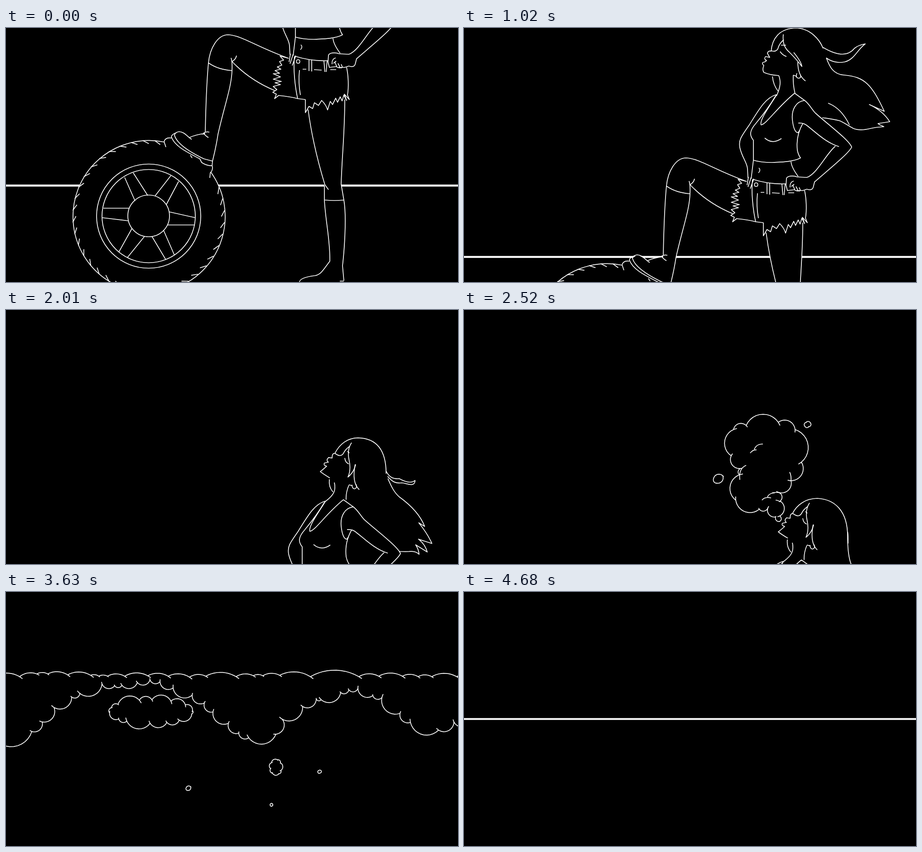
An HTML page that plays this animation: 998 by 561 pixels, repeating every 4830 ms.

```html
<!DOCTYPE html>
<html lang="en">
<head>
<meta charset="utf-8">
<title>Smoke and horizon</title>
<style>
html, body { margin: 0; width: 100%; height: 100%; overflow: hidden; background: #000; }
svg { display: block; width: 100vw; height: 100vh; background: #000; }
path, circle { fill: none; stroke: #fff; stroke-width: 1.7; stroke-linejoin: round; vector-effect: non-scaling-stroke; }
.mask { fill: #000; stroke: none; }
.solid { fill: #000; }
</style>
</head>
<body>
<svg id="stage" viewBox="0 0 998 561">
  <path id="horizon" d="M-5 0H1003"/>
  <g id="figure">
    <g id="wheel">
      <circle class="mask" cx="315" cy="416" r="168"/>
      <circle cx="315" cy="415.5" r="115"/>
      <circle cx="315" cy="415.5" r="103"/>
      <circle cx="315" cy="415" r="46"/>
      <path d="M350 252A168 168 0 1 0 452 318"/>
      <path d="M262 330L285 382M281 320L313 370M364 326L329 371M381 339L354 390M360 406L418 419M357 435H417M348 447L372 502M322 460L353 512M306 460L268 507M278 443L249 495M213 419L271 426M215 398H272"/>
      <path id="tread"/>
    </g>
    <!-- standing leg -->
    <path class="mask" d="M667 175C675 240 690 300 703 348V381C706 430 716 470 715 515C700 535 695 547 680 547Q650 551 648 561V640H746V561L743 525C746 500 752 420 746 380L740 345C742 280 748 230 748 155Z"/>
    <path d="M667 180C675 240 690 300 704 346L712 357M703 348V381C706 430 716 470 715 515C700 535 695 545 682 547Q649 551 648 561M748 158C748 230 742 280 740 345L746 380C753 420 746 500 743 525L746 558M704 380Q725 382 746 380M737 559H746"/>
    <!-- raised leg and shoe -->
    <path class="mask" d="M447 77C442 140 441 180 440 232L407 242L384 229L365 240L352 244L350 253L370 252L428 290L451 305L456 294L468 235C490 150 499 130 500 94Z"/>
    <path d="M447 77C450 45 467 15 490 15C520 16 550 40 624 67M447 77Q468 92 499 94M447 77C442 130 441 180 440 229M499 94C498 130 482 172 468 235Q464 262 456 294M497 66Q500 76 499 94M509 61Q507 70 499 74Q538 115 593 138"/>
    <path d="M436 232Q442 228 449 230M436 232Q440 238 447 242M440 233Q420 235 405 242M410 246C400 240 394 229 382 229Q373 230 372 237C378 258 410 276 437 289L456 294L455 304Q444 305 432 297L428 289C395 272 372 260 365 240Q367 234 377 231M365 243Q352 241 349 251L353 263M455 304Q458 313 451 320L450 331M407 281L411 287"/>
    <!-- shorts -->
    <path d="M624 67L605 62L613 71L604 74L609 82L599 86L607 91L594 94L604 100L590 101L606 108L590 113L608 118L594 121L606 125L590 129L598 136L589 142L597 146L593 156L602 149Q630 152 644 156L661 158"/>
    <path d="M661 158V187L669 173L677 178L681 165L690 171L697 160Q707 170 710 181L716 162L721 169L728 155L732 164L738 152L742 161L746 148L752 160L747 146L758 158L754 148C757 130 756 105 752 87"/>
    <path d="M637 62Q675 74 712 72M628 57L625 75M634 58L627 79M640 61L632 83M637 63C634 90 638 130 644 156M648 93Q645 120 650 148M669 70V95M675 71V96M702 73L704 97M709 72L707 97M655 91H663M680 92L697 93M716 92H729M734 88H742M645 70C640 70 640 78 645 78S650 70 645 70"/>
    <!-- hair behind the arm -->
    <path id="hair"/><path id="strand"/><path id="wisp"/>
    <path class="mask" d="M752 -112C762 -105 768 -92 776 -84C800 -62 850 -25 856 -9C850 5 800 45 774 68L757 58C780 45 805 0 820 -11Q780 -30 738 -62Z"/>
    <!-- torso and arms -->
    <path d="M690 -125C665 -118 650 -90 630 -58C612 -32 606 -25 609 -8C614 15 626 26 626 40L627 59M688 -122C672 -95 660 -80 645 -62C630 -45 630 -35 639 -24V20L634 61M690 -124C672 -95 652 -68 656 -58C668 -60 690 -95 730 -128L752 -112C732 -110 723 -90 725 -70C727 -50 732 -40 738 -41L741 -46"/>
    <path d="M748 -61C736 -40 734 -20 736 -2Q738 8 743 15C725 25 690 24 680 25Q655 25 639 20M664 -29Q681 -14 701 -28M722 23Q723 36 738 56M651 37Q656 42 650 48"/>
    <path d="M752 -112C762 -105 768 -92 776 -84C800 -62 850 -25 856 -9C850 5 800 45 774 68L771 80Q768 88 757 84M738 -62Q750 -63 758 -56C775 -43 800 -18 828 -10M820 -11C800 5 780 50 757 58L736 57C725 53 714 55 712 60L711 75L714 87L731 85M728 66Q719 68 720 80M723 78L729 73M726 75L731 87M733 78L737 86M740 80L743 87M731 87H748L757 84"/>
    <g id="head"></g>
  </g>
  <path id="cloud"/>
  <path id="folds" d="M632 316Q638 308 646 309M641 308Q645 296 660 296M623 343Q606 350 609 375M719 358Q723 366 722 378M658 420Q664 412 678 415M670 413Q674 404 686 404M680 404Q688 402 699 404M688 420Q694 420 698 424"/>
  <path id="puffs"/>
</svg>
<script>
const LOOP = 4830, STEP = 30;
const $ = id => document.getElementById(id);
const clamp = (v, a = 0, b = 1) => Math.min(b, Math.max(a, v));
const mix = (a, b, u) => a + (b - a) * u;
const smooth = u => u * u * (3 - 2 * u);

// smooth curve through keys [time, value, ...]; i picks the value
function track(keys, t, i = 1) {
  const n = keys.length - 1;
  if (t <= keys[0][0]) return keys[0][i];
  if (t >= keys[n][0]) return keys[n][i];
  let k = 0;
  while (t > keys[k + 1][0]) k++;
  const slope = j => {
    const a = keys[Math.max(0, j - 1)], b = keys[Math.min(n, j + 1)];
    return (b[i] - a[i]) / (b[0] - a[0]);
  };
  const [a, b] = [keys[k], keys[k + 1]], d = b[0] - a[0], u = (t - a[0]) / d, w = smooth(u);
  return mix(a[i], b[i], w) + d * u * (1 - u) * (slope(k) * (1 - u) - slope(k + 1) * u);
}

const RISE = [[0, 0], [600, 175], [1020, 272], [1560, 428], [2520, 680], [3200, 864]];
const DRIFT = [[1020, 0], [1560, 15]];
const shift = t => [track(DRIFT, t), track(RISE, t)];

// keys hold stage coordinates; the result is relative to the figure
function morph(keys, t) {
  let k = 0;
  while (k < keys.length - 2 && t > keys[k + 1][0]) k++;
  const a = keys[k], b = keys[k + 1] || a;
  const u = b === a ? 0 : smooth(clamp((t - a[0]) / (b[0] - a[0])));
  const sa = shift(a[0]), sb = shift(b[0]);
  const to = b[1].match(/-?\d+/g);
  let i = 0;
  return a[1].replace(/-?\d+/g, v => {
    const c = i % 2, r = mix(v - sa[c], to[i] - sb[c], u);
    i++;
    return r.toFixed(1);
  });
}

const HAIR = [
  [600, "M800 -31C810 -15 860 -30 900 -40C960 -35 990 -20 984 -6L972 4Q962 15 959 22L975 26Q988 31 998 29L998 32Q996 36 992 41C968 46 960 55 930 49C890 50 890 85 858 82C830 78 835 48 795 62C765 64 745 58 730 38"],
  [1020, "M800 66C807 85 815 103 840 104C885 108 900 125 928 184L895 169Q925 183 940 207L914 211Q916 212 918 214L918 214Q924 216 927 218C910 219 905 220 897 222C885 225 870 226 860 222C850 217 845 212 830 205C815 201 805 200 791 198"],
  [1560, "M840 258C855 276 865 277 880 281C925 288 945 310 953 335L939 327Q965 348 978 371L936 360Q958 372 965 397L933 376Q942 390 942 403C935 394 925 393 915 395C900 396 885 395 858 392C870 404 878 404 881 405C850 408 830 350 782 332"],
  [2520, "M847 500C847 520 848 545 855 562C865 600 880 620 890 640L878 632Q890 660 895 680L880 672Q885 680 888 690L870 680Q874 686 876 694C870 690 865 690 860 690C850 690 840 690 830 690C820 690 815 690 810 690C800 690 790 680 785 660"]
];
const WISP = [
  [1020, "M793 43C830 65 850 60 862 45Q870 38 886 35C868 48 862 70 840 75C825 78 810 74 800 66"],
  [1560, "M833 236C845 258 862 260 885 254Q930 274 949 253C948 285 915 268 895 271C870 278 858 276 839 257"],
  [2520, "M847 490C848 495 848 500 848 505Q848 510 848 515C848 512 848 510 848 505C848 500 848 495 847 490"]
];
const STRAND = [
  [600, "M830 -2Q845 10 863 10"], [1020, "M804 166Q833 177 851 214"],
  [1560, "M841 363Q848 370 857 392"], [2520, "M800 640Q805 655 810 670"]
];
const HEAD = [
  ["M678 52C680 25 695 0 735 0C765 2 785 25 793 45", "M727 198C738 175 755 163 775 163C815 163 833 185 833 238", "M725 450C735 430 755 416 780 416C820 418 847 445 847 500"],
  ["M678 51Q671 50 670 56L675 65L666 63Q661 68 668 72L664 75Q655 76 662 83Q658 92 662 98Q675 104 695 105", "M727 198Q720 196 720 208L712 207L709 211Q709 217 712 217L703 219Q700 224 708 226L704 230Q694 238 700 243Q715 252 725 262"],
  ["M678 50Q688 54 693 46Q696 34 706 26", "M727 198Q740 208 746 196Q750 188 759 182"],
  ["M705 14Q702 40 718 53Q735 70 746 85Q745 75 728 54", "M763 174Q752 190 758 215Q762 235 755 250Q768 240 772 222"],
  ["M737 75Q737 105 754 117", "M771 222Q763 262 780 278"],
  ["M700 38L711 38M698 52Q703 60 712 63", "M754 193L758 197M748 208Q749 218 757 221"],
  ["M695 105C700 118 699 130 690 150M681 107Q683 127 694 140", "M725 262C729 280 724 290 705 304M714 255Q712 272 722 283"],
  ["M727 104Q726 125 731 145M727 104L735 107", "M757 268Q750 285 751 300M757 267L764 269"],
  ["M735 100Q731 110 739 111Q745 110 743 104", "M764 267Q764 276 770 276Q776 274 773 266"]
].map(list => list.map((d, i) => [[1020, 1560, 2520][i], d]));

const pairs = s => s.split(" ").map(p => p.split(",").map(Number));
const PLUME = pairs("623,255 694,248 731,264 745,336 722,377 695,403 698,422 697,455 697,467 688,457 671,437 652,440 600,420 608,364 611,350 590,322 595,264");
const TOP = pairs("-25,186 30,187 68,181 92,181 136,183 187,184 205,186 224,186 262,186 313,185 358,186 405,188 441,186 508,187 546,185 567,185 604,184 672,187 779,187 823,186 875,186 910,187 940,187 995,187 1025,186");
const UNDER = pairs("1025,288 989,287 955,305 893,288 870,268 830,233 810,229 777,213 757,216 739,222 696,238 685,236 655,253 610,281 596,314 536,322 514,312 491,290 457,265 438,245 411,228 369,212 340,198 318,194 290,200 256,206 240,207 212,203 163,224 145,232 106,255 80,287 57,308 -25,325");
// several edge points share one plume point, so new bumps swell from nothing
const spread = (list, ids, k) => list.map((end, i) => ({ start: PLUME[ids[Math.floor(i * ids.length / list.length)]], end, k }));
const EDGE = [
  ...spread(TOP, [16, 0, 1, 2, 3], 1),
  ...spread(UNDER, [4, 5, 6, 7, 8, 9, 10, 11, 12, 13, 14, 15], .57)
];

// outward arc from p to q with a short hook past its end
function bump(p, q, k, flat = y => y) {
  const dx = q[0] - p[0], dy = q[1] - p[1], c = Math.hypot(dx, dy);
  if (c < .6) return "";
  const r = c * k, h = Math.sqrt(Math.max(0, r * r - c * c / 4));
  const cx = (p[0] + q[0]) / 2 - dy / c * h, cy = (p[1] + q[1]) / 2 + dx / c * h;
  const a = Math.atan2(p[1] - cy, p[0] - cx);
  const sweep = 2 * Math.asin(Math.min(1, .5 / k)) + Math.min(8, c * .16) / r;
  let d = "";
  for (let i = 0; i <= 12; i++) {
    const w = a + sweep * i / 12;
    d += (i ? "L" : "M") + (cx + r * Math.cos(w)).toFixed(1) + " " + flat(cy + r * Math.sin(w)).toFixed(1);
  }
  return d;
}

const GROW = [[2130, 0], [2300, .35], [2520, 1], [2700, 1.75], [3000, 2.3]];
const LEVEL = [[3240, 80], [3630, 181], [3780, 217], [4050, 256], [4320, 277], [4620, 280.5]];
const HEIGHT = [[3600, 1], [3660, 1], [3780, .82], [4050, .42], [4320, .1], [4560, 0]];
const mouth = t => [697, 467 + track(RISE, t) - 680];

function cloud(t) {
  if (t < 2140 || t > 4620) return "";
  const s = track(GROW, t), m = mouth(t), u = smooth(clamp((t - 2540) / 700));
  const level = track(LEVEL, t), h = clamp(track(HEIGHT, t));
  const flat = y => level + (y - level) * h;
  const pts = EDGE.map(e => [
    mix(m[0] + (e.start[0] - 697) * s, e.end[0], u),
    mix(m[1] + (e.start[1] - 467) * s, e.end[1] - 181 + level, u)
  ]);
  return pts.map((p, i) => bump(p, pts[(i + 1) % pts.length], mix(.57, EDGE[i].k, u), flat)).join("");
}

// size, bump count, then keys: time, x, y, scale
const PUFFS = [
  { rx: 11, ry: 11, n: 3, keys: [[2300, 690, 450, 0], [2520, 562, 372, 1], [2700, 320, 360, 1], [3240, 380, 474, .7], [3630, 403, 433, .5], [4350, 420, 390, 0]] },
  { rx: 9, ry: 5, n: 4, keys: [[2320, 705, 430, 0], [2520, 758, 253, 1], [2700, 820, 210, 1.1], [3240, 750, 440, .8], [3630, 692, 397, .55], [4400, 660, 388, 0]] },
  { rx: 12, ry: 17, n: 7, keys: [[2900, 600, 500, 0], [3240, 600, 440, 1.2], [3630, 596, 387, 1], [4400, 590, 310, 0]] },
  { rx: 3, ry: 3, n: 4, keys: [[2900, 590, 590, 0], [3240, 588, 508, 1.2], [3630, 586, 470, 1], [3800, 586, 436, 0]] },
  { rx: 92, ry: 26, n: 14, keys: [[3000, 330, 190, 0], [3240, 326, 180, .8], [3630, 320, 264, 1], [4000, 330, 292, .55], [4350, 340, 285, 0]] }
];

function puff({ rx, ry, n, keys }, t) {
  if (t <= keys[0][0] || t >= keys[keys.length - 1][0]) return "";
  const [x, y, s] = [1, 2, 3].map(i => track(keys, t, i));
  if (s < .05) return "";
  const pts = Array.from({ length: n }, (_, i) => {
    const a = (i + .22 * Math.sin(i * 2.4)) / n * 2 * Math.PI - .6;
    return [x + rx * s * Math.cos(a), y + ry * s * Math.sin(a)];
  });
  return pts.map((p, i) => bump(p, pts[(i + 1) % n], .58)).join("");
}

let tread = "";
for (let a = 4.5; a < 360; a += 9) {
  if (a > 278 && a < 330) continue;
  const w = a * Math.PI / 180, c = Math.cos(w), s = Math.sin(w);
  tread += `M${315 + 168 * c} ${416 + 168 * s}l${-8 * c - 13 * s} ${-8 * s + 13 * c}`;
}
$("tread").setAttribute("d", tread);

const set = (el, d) => el.setAttribute("d", d);
const headPaths = HEAD.map(() => $("head").appendChild(document.createElementNS("http://www.w3.org/2000/svg", "path")));

function draw(t) {
  const late = t > 2000;
  const [x, y] = shift(t);
  $("horizon").setAttribute("transform", `translate(0 ${late ? 280.5 : 348 + .1545 * t})`);
  $("horizon").style.strokeWidth = late ? 4 * clamp((t - 4260) / 300) : 4.4;
  $("figure").setAttribute("transform", `translate(${x} ${y})`);
  $("figure").style.display = t < 3240 ? "" : "none";
  if (t < 3240) {
    set($("hair"), morph(HAIR, t));
    set($("wisp"), morph(WISP, t));
    set($("strand"), morph(STRAND, t));
    HEAD.forEach((keys, i) => set(headPaths[i], morph(keys, t)));
  }
  set($("cloud"), cloud(t));
  const m = mouth(t), s = track(GROW, t);
  $("folds").style.display = t > 2300 && t < 2700 ? "" : "none";
  $("folds").setAttribute("transform", `translate(${m[0]} ${m[1]}) scale(${s}) translate(-697 -467)`);
  set($("puffs"), PUFFS.map(p => puff(p, t)).join(""));
}

const begin = performance.now();
function tick() {
  const t = (performance.now() - begin) % LOOP;
  draw(Math.min(4680, Math.floor(t / STEP) * STEP));
  requestAnimationFrame(tick);
}
tick();
</script>
</body>
</html>
```
